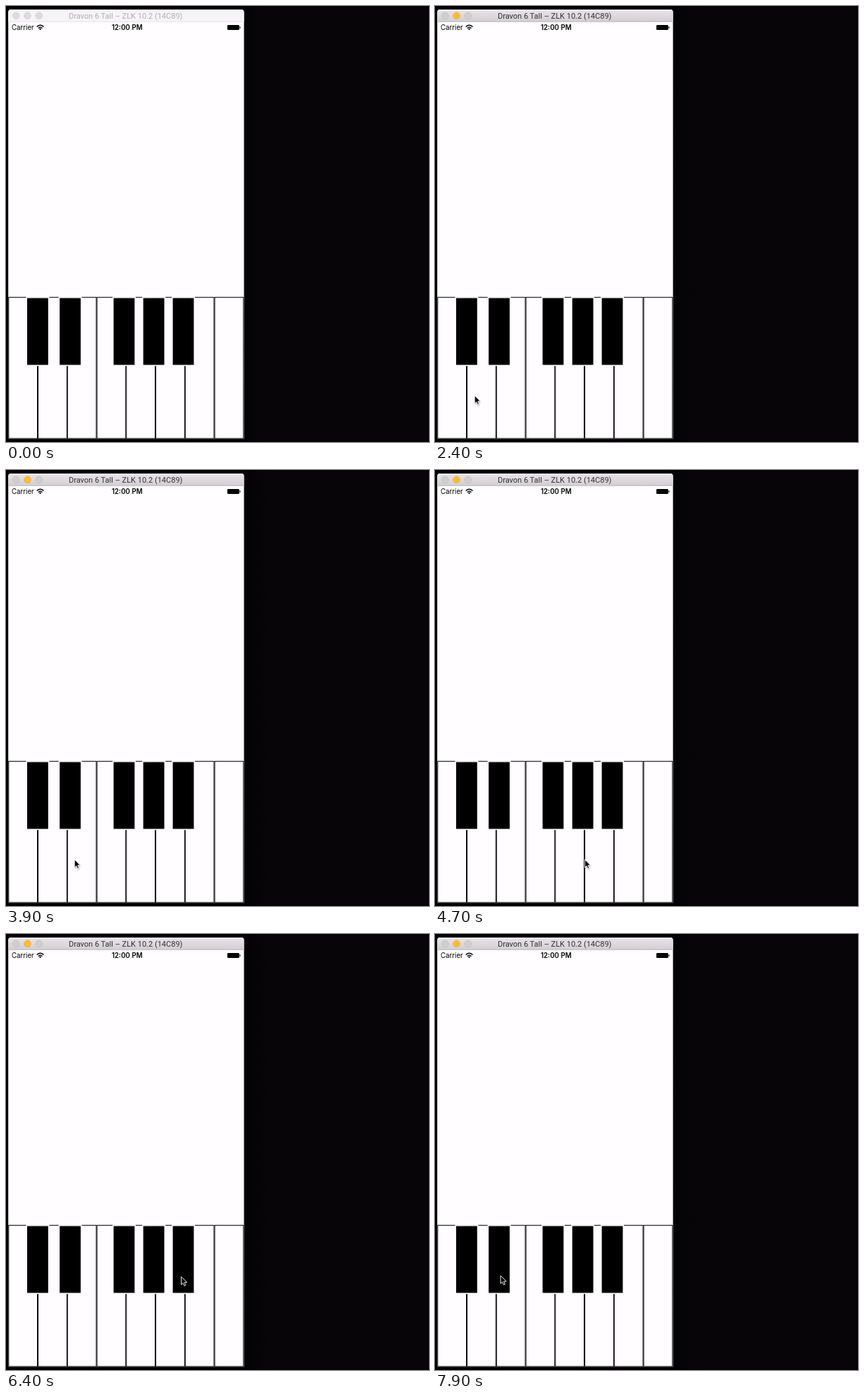
Recreate the animation shown at these times as an HTML page. Size 600 by 619 pixels, loop 8 s.

```html
<!DOCTYPE html>
<html lang="en">
<head>
<meta charset="utf-8">
<title>Piano keys</title>
<style>
  html, body { margin: 0; width: 100%; height: 100%; overflow: hidden; background: #070508; }
  svg { display: block; width: 100vw; height: 100vh; }
  .title { font: 11px Roboto, sans-serif; text-anchor: middle; }
  .status { font: 9.7px Inter, sans-serif; }
  .clock { font-weight: 600; text-anchor: middle; }
</style>
</head>
<body>
<svg viewBox="0 0 600 619" xmlns="http://www.w3.org/2000/svg">
  <defs>
    <linearGradient id="bar" x1="0" y1="0" x2="0" y2="1">
      <stop offset="0" stop-color="#e9e5e9"/>
      <stop offset="1" stop-color="#d1cdd1"/>
    </linearGradient>
    <linearGradient id="shade">
      <stop offset="0" stop-color="#020104"/>
      <stop offset=".3" stop-color="#040306"/>
      <stop offset="1" stop-color="#070508"/>
    </linearGradient>
    <filter id="soft" x="-100%" y="-100%" width="300%" height="300%">
      <feGaussianBlur stdDeviation="1.1"/>
    </filter>
    <path id="arrow" d="M0 0V11.4L2.6 9 4.4 13 6.3 12.2 4.6 8.2H8.2Z"/>
  </defs>

  <rect width="600" height="619" fill="#070508"/>
  <rect width="338" height="619" fill="#020103"/>
  <rect id="shadow" x="337" height="619" fill="url(#shade)"/>

  <path d="M3.2 614.5V9q0-4 4-4H333.6q4 0 4 4V614.5Z" fill="#fffdff"/>
  <path id="titleBar" d="M3.2 22.5V9q0-4 4-4H333.6q4 0 4 4V22.5Z"/>
  <path id="barEdge" d="M3.2 22.3H337.6" stroke-width=".7"/>
  <g id="lights" stroke-width=".7"></g>
  <text id="title" class="title" x="169.7" y="17.7">Dravon 6 Tall – ZLK 10.2 (14C89)</text>

  <text class="status" x="8" y="34.4">Carrier</text>
  <text class="status clock" x="171.8" y="34.4">12:00 PM</text>
  <g fill="none" stroke="#000" stroke-width="1.5">
    <path d="M43.7 29.5Q48.6 25.1 53.5 29.5"/>
    <path d="M45.6 31.5Q48.6 28.9 51.6 31.5"/>
    <path d="M46.9 32.3Q48.6 31 50.3 32.3L48.6 34.2Z" fill="#000" stroke="none"/>
  </g>
  <rect x="314" y="27" width="16.8" height="7" rx="1"/>
  <rect x="331.4" y="29.2" width="1.2" height="2.6" rx=".6"/>

  <g id="keys"></g>

  <g id="cursor">
    <use href="#arrow" x=".6" y="1.4" opacity=".4" filter="url(#soft)"/>
    <use href="#arrow" fill="#0a080a" stroke="#fff" stroke-width=".9" stroke-linejoin="round"/>
  </g>
</svg>

<script>
const LOOP = 8000, STEP = 100, ACTIVATE = 1600;
const LEFT = 3.3, TOP = 413.1, PITCH = 41.75, THICKEN = 1.6;
const WHITE = { width: PITCH, height: 201.4, border: 1, edge: '#000', fill: '#fffdff', touchY: 553 };
const BLACK = { width: 33, height: 98, border: 1.6, edge: '#fffdff', fill: '#000', touchY: 485 };
const $ = id => document.getElementById(id);

function set(node, attrs) {
  for (const name in attrs) node.setAttribute(name, attrs[name]);
}

function add(parent, tag, attrs) {
  const node = document.createElementNS('http://www.w3.org/2000/svg', tag);
  set(node, attrs);
  parent.append(node);
  return node;
}

// A key is an edge-coloured rectangle whose inner face shrinks when pressed.
function makeKey(x, kind) {
  const { width, height, edge, fill } = kind;
  add($('keys'), 'rect', { x, y: TOP, width, height, fill: edge });
  return { x, ...kind, face: add($('keys'), 'rect', { fill }) };
}

function drawKey({ x, width, height, border, face }, pressed) {
  const b = border + (pressed ? THICKEN : 0);
  set(face, { x: x + b, y: TOP + b, width: width - 2 * b, height: height - 2 * b });
}

const whites = Array.from({ length: 8 }, (_, i) => makeKey(LEFT + i * PITCH, WHITE));
const blacks = [28.4, 74.5, 151, 193.1, 235].map(x => makeKey(x, BLACK));
const lights = [0, 1, 2].map(i => add($('lights'), 'circle', { cx: 14.3 + i * 16.2, cy: 13.8, r: 4.8 }));

// The cursor rests at each stop from one time to another; a stop with a key holds it down.
const rest = (x, y, from, to) => ({ x, y, from, to });
const press = (key, from, to, nudge = -4.5) =>
  ({ key, x: key.x + key.width / 2 + nudge, y: key.touchY, from, to });

const stops = [
  rest(342, 449, 500, 500),
  rest(37, 555, 1300, 1700),
  press(whites[0], 1800, 2200, 13),
  press(whites[1], 2500, 3100, -9),
  press(whites[2], 3400, 3900, -10.5),
  press(whites[3], 4100, 4300),
  press(whites[3], 4400, 4600),
  press(whites[5], 4900, 5200, 8),
  press(whites[6], 5400, 5600, 16.5),
  rest(314, 548, 5800, 5900),
  press(blacks[4], 6600, 6800),
  press(blacks[3], 7100, 7300),
  press(blacks[2], 7600, 7700),
  rest(93, 485, 7900, LOOP)
];

const easeOut = k => 1 - (1 - k) ** 3;

function cursorAt(t) {
  const i = stops.findLastIndex(stop => stop.from <= t);
  const a = stops[i], b = stops[i + 1];
  if (t <= a.to || !b) return [a.x, a.y];
  const k = easeOut((t - a.to) / (b.from - a.to));
  return [a.x + (b.x - a.x) * k, a.y + (b.y - a.y) * k];
}

function drawWindow(active) {
  set($('titleBar'), { fill: active ? 'url(#bar)' : '#f6f4f6' });
  set($('barEdge'), { stroke: active ? '#b5b3b5' : '#dedcde' });
  set($('title'), { fill: active ? '#333133' : '#b0aeb0' });
  set($('shadow'), { width: active ? 40 : 26 });
  set($('lights'), {
    fill: active ? '#d0ced0' : '#dddbdd',
    stroke: active ? '#bcbabc' : '#d0ced0'
  });
  set(lights[1], active ? { fill: '#fdbb2d', stroke: '#eaac2c' } : { fill: 'inherit', stroke: 'inherit' });
}

function render(time) {
  const t = Math.floor(time % LOOP / STEP) * STEP;
  drawWindow(t >= ACTIVATE);
  for (const key of [...whites, ...blacks])
    drawKey(key, stops.some(s => s.key === key && t >= s.from && t < s.to));
  const visible = t >= stops[0].from;
  set($('cursor'), { visibility: visible ? 'visible' : 'hidden' });
  if (visible) set($('cursor'), { transform: `translate(${cursorAt(t)})` });
}

const start = performance.now();
function tick(now) {
  render(Math.max(0, now - start));
  requestAnimationFrame(tick);
}
render(0);
requestAnimationFrame(tick);
</script>
</body>
</html>
```
